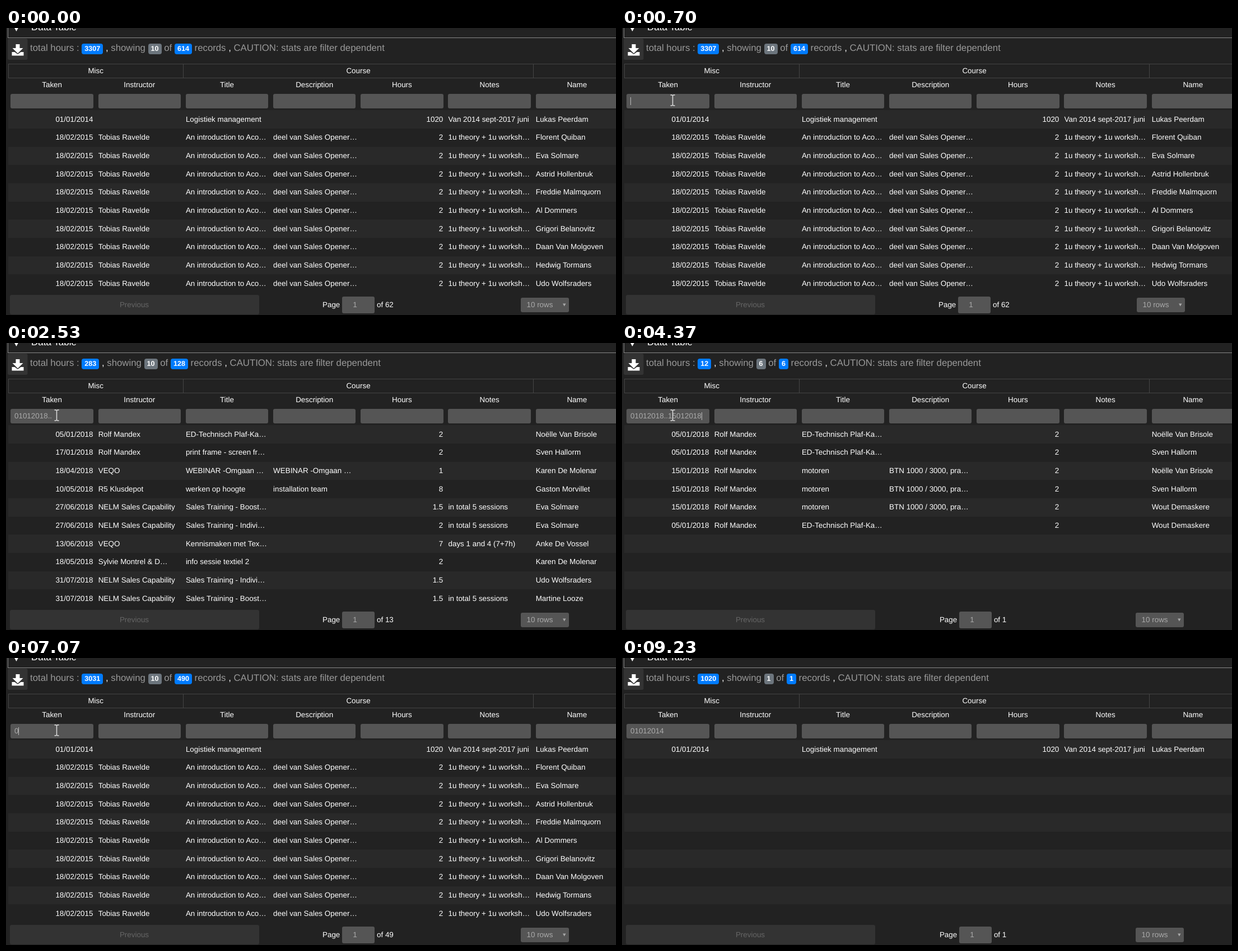
Write an HTML page that moves like this. It is 1089 by 514 pixels and loops after 9270 ms.

```html
<!DOCTYPE html>
<html lang="en">
<head>
<meta charset="utf-8">
<title>Data Table</title>
<style>
html, body { margin: 0; width: 100%; height: 100%; overflow: hidden; background: #222; }
#stage { position: relative; width: 1089px; height: 514px; overflow: hidden; color: #fff;
  font: 13.42px/20px "Liberation Sans", Arial, sans-serif; text-rendering: geometricPrecision; }
#stage div, svg { position: absolute; white-space: pre; box-sizing: border-box; }
.box { background: #555; border-radius: 3px; }
.line { border: 1px solid #444; }
.mid { text-align: center; }
#stats { left: 43px; top: 24px; line-height: 24px; font-size: 16.78px; color: #999; }
#stats i { font-style: normal; color: #fff; }
#stats b { display: inline-block; padding: .25em .4em; border-radius: 4px; font-size: 75%;
  line-height: 1; color: #fff; background: #007bff; vertical-align: baseline; }
#stats b.grey { background: #6c757d; }
</style>
</head>
<body>
<div id="stage">
  <div id="base"></div>
  <div id="rows"></div>
  <div id="stats"></div>
  <div id="cells"></div>
  <div id="pager"></div>
  <div id="query" style="left:15px;top:120.5px;color:#aaa"></div>
  <div id="caret" style="top:124px;width:1px;height:14px;background:#bbb"></div>
  <svg width="1089" height="514" style="left:0;top:0">
    <path d="M13 -4H24L18.5 6Z" fill="#fff"/>
    <rect x="3" y="19" width="35.5" height="38" rx="3" fill="#333"/>
    <path d="M17.5 29h7v7h6L21 45.5 11.5 36h6ZM10.5 43h5l5.5 4 5.5-4h5v6.5h-21Z" fill="#fff"/>
    <path d="M994 493.5h5.500l-2.750 5z" id="arrow" fill="#aaa"/>
    <g id="mouse">
      <path id="beam" d="M-4 -9.500H-1.500L0 -8.500L1.500 -9.500H4M0 -8.500V8.500M-4 9.500H-1.500L0 8.500L1.500 9.500H4" fill="none" stroke="#ddd" stroke-width="1.5"/>
      <path id="pointer" d="M0 0V16L3.700 12.500L6.200 18.500L8.700 17.400L6.200 11.600H11.300Z" fill="#fff" stroke="#000"/>
    </g>
  </svg>
</div>
<script>
const LOOP = 9270, COL = 156.2, ROW = 32.67, TOP = 147.4, BLINK = 530;
const $ = id => document.getElementById(id);
const colX = i => 4 + COL * i;
const div = (x, y, w, h, cls, style = '') =>
  `<div class="${cls}" style="left:${x}px;top:${y}px;width:${w}px;height:${h}px;${style}"></div>`;
const text = (x, y, s, style = '') =>
  `<div style="left:${x}px;top:${y - 10}px;${style}">${s}</div>`;
const centred = (x, y, s, style = '') => text(x - 150, y, s, 'width:300px;text-align:center;' + style);
const right = (x, y, s) => text(x - 150, y, s, 'width:150px;text-align:right');

// Table contents: taken, instructor, title, description, hours, notes, name
const coach = 'Rolf Mandex', agency = 'NELM Sales Capability', school = 'VEQO';
const ceiling = 'ED-Technisch Plaf-Ka…', sessions = 'in total 5 sessions';
const boost = 'Sales Training - Boost…', indiv = 'Sales Training - Indivi…';
const noelle = 'Noëlle Van Brisole', sven = 'Sven Hallorm', wout = 'Wout Demaskere';
const eva = 'Eva Solmare', karen = 'Karen De Molenar', udo = 'Udo Wolfsraders';

const first = ['01/01/2014', '', 'Logistiek management', '', 1020, 'Van 2014 sept-2017 juni', 'Lukas Peerdam'];
const all = [first, ...['Florent Quiban', eva, 'Astrid Hollenbruk', 'Freddie Malmquorn', 'Al Dommers',
  'Grigori Belanovitz', 'Daan Van Molgoven', 'Hedwig Tormans', udo].map(name =>
  ['18/02/2015', 'Tobias Ravelde', 'An introduction to Aco…', 'deel van Sales Opener…', 2, '1u theory + 1u worksh…', name])];
const year = [
  ['05/01/2018', coach, ceiling, '', 2, '', noelle],
  ['17/01/2018', coach, 'print frame - screen fr…', '', 2, '', sven],
  ['18/04/2018', school, 'WEBINAR -Omgaan …', 'WEBINAR -Omgaan …', 1, '', karen],
  ['10/05/2018', 'R5 Klusdepot', 'werken op hoogte', 'installation team', 8, '', 'Gaston Morvillet'],
  ['27/06/2018', agency, boost, '', 1.5, sessions, eva],
  ['27/06/2018', agency, indiv, '', 2, sessions, eva],
  ['13/06/2018', school, 'Kennismaken met Tex…', '', 7, 'days 1 and 4 (7+7h)', 'Anke De Vossel'],
  ['18/05/2018', 'Sylvie Montrel &amp; D…', 'info sessie textiel 2', '', 2, '', karen],
  ['31/07/2018', agency, indiv, '', 1.5, '', udo],
  ['31/07/2018', agency, boost, '', 1.5, sessions, 'Martine Looze']];
const lesson = name => ['05/01/2018', coach, ceiling, '', 2, '', name];
const motor = name => ['15/01/2018', coach, 'motoren', 'BTN 1000 / 3000, pra…', 2, '', name];
const fortnight = [lesson(noelle), lesson(sven), motor(noelle), motor(sven), motor(wout), lesson(wout)];

const views = [
  { at: 0, hours: 3307, total: 614, rows: all },
  { at: 1600, hours: 0, total: 0, rows: [] },
  { at: 2470, hours: 283, total: 128, rows: year },
  { at: 4370, hours: 12, total: 6, rows: fortnight },
  { at: 5510, hours: 3031, total: 490, rows: all },
  { at: 7900, hours: 1020, total: 1, rows: [first] }];

// Filter field edits: time, value, caret index (-1 hides the caret)
const edits = [];
let value = '';
const edit = (at, v, caret = v.length) => edits.push({ at, value: value = v, caret });
const type = (at, step, s) => [...s].forEach((c, i) => edit(at + i * step, value + c));
edit(0, '', -1);
edit(640, '');
type(830, 50, '0101');
type(1070, 90, '2018');
type(2110, 60, '..');
edit(2500, value, -1);
type(3150, 60, '1');
type(3220, 150, '5012018');
edit(4620, value, 0);
for (let i = 0; i < 8; i++) edit(4720 + i * 85, value.slice(1), 0);
edit(5800, value, 0);
edit(6790, '');
type(6990, 100, '01012014');
edit(8750, value, -1);

// Mouse path: time, x, y
const path = [[20, 1078, 385], [560, 90, 119], [660, 90, 129], [8860, 90, 129], [9230, 1080, 530]];
const ease = k => k * k * (3 - 2 * k);
function mouseAt(t) {
  const i = path.findIndex(p => p[0] > t);
  if (i < 1) return null;
  const [t0, x0, y0] = path[i - 1], [t1, x1, y1] = path[i], k = ease((t - t0) / (t1 - t0));
  return [x0 + (x1 - x0) * k, y0 + (y1 - y0) * k];
}

function buildBase() {
  let s = div(3, -20, 1100, 38, '', 'border:1px solid #888') +
    text(45, -1, 'Data Table', 'font-size:17px');
  [0, 2, 6].forEach((c, i) => s += div(colX(c), 64, [313, 626, 400][i], 26, 'line'));
  s += centred(160.2, 77, 'Misc') + centred(629, 77, 'Course');
  ['Taken', 'Instructor', 'Title', 'Description', 'Hours', 'Notes', 'Name'].forEach((name, i) => {
    s += centred(colX(i + .5), 102, name) + div(colX(i) + 4.4, 118, 147.4, 25.5, 'box');
  });
  $('base').innerHTML = s + div(6.500, 478, 445, 35, 'box', 'background:#333') +
    centred(229, 495.500, 'Previous', 'color:#666');
  $('rows').innerHTML = Array.from({ length: 10 }, (_, i) => div(4, TOP + i * ROW, 1085, ROW, '')).join('');
}

function showView({ hours, total, rows }) {
  $('stats').innerHTML = `total hours : <b>${hours}</b> <i>,</i> showing <b class="grey">${rows.length}</b> of ` +
    `<b>${total}</b> records <i>,</i> CAUTION: stats are filter dependent`;
  $('cells').innerHTML = rows.map((row, r) => row.map((v, c) => {
    const y = TOP + (r + .5) * ROW;
    return c % 4 ? text(colX(c) + 4.5, y, v) : right(colX(c + 1) - 4.7, y, v);
  }).join('')).join('');
  const pages = Math.max(1, Math.ceil(total / 10)), dx = pages < 10 ? 1.9 : 0;
  $('pager').innerHTML = text(565 + dx, 495.5, 'Page') + div(600 + dx, 481, 58, 30, 'box') +
    centred(623 + dx, 495.5, 1, 'color:#aaa') + text(662 + dx, 495.5, 'of ' + pages) +
    div(919 - dx, 483, 86, 26, 'box') + text(929.5 - dx, 496, '10 rows', 'color:#aaa');
  $('arrow').setAttribute('transform', `translate(${-dx})`);
}

const pen = document.createElement('canvas').getContext('2d');
pen.font = '13.42px "Liberation Sans", Arial, sans-serif';
const current = (list, t) => list.filter(e => e.at <= t).pop();
const show = (id, on) => $(id).style.display = on ? '' : 'none';
let shown;

function draw(now) {
  const t = now % LOOP, view = current(views, t), e = current(edits, t), m = mouseAt(t);
  if (view !== shown) showView(shown = view);

  $('query').textContent = e.value;
  show('caret', e.caret >= 0 && Math.floor((t - e.at) / BLINK) % 2 === 0);
  $('caret').style.left = 15 + pen.measureText(e.value.slice(0, e.caret)).width + 'px';

  const hover = m ? Math.floor((m[1] - TOP) / ROW) : -1;
  [...$('rows').children].forEach((row, i) =>
    row.style.background = i === hover && i < view.rows.length ? '#303030' : i % 2 ? '#222' : '#292929');

  show('mouse', m);
  if (m) {
    const inField = m[0] > 8 && m[0] < 156 && m[1] > 118 && m[1] < 144;
    show('beam', inField);
    show('pointer', !inField);
    $('mouse').setAttribute('transform', `translate(${m[0] + .5} ${m[1] + .5})`);
  }
  requestAnimationFrame(draw);
}

buildBase();
const start = performance.now();
(function loop() { draw(0); })();
const tick = draw;
draw = now => tick(Math.max(0, now - start));
</script>
</body>
</html>
```
